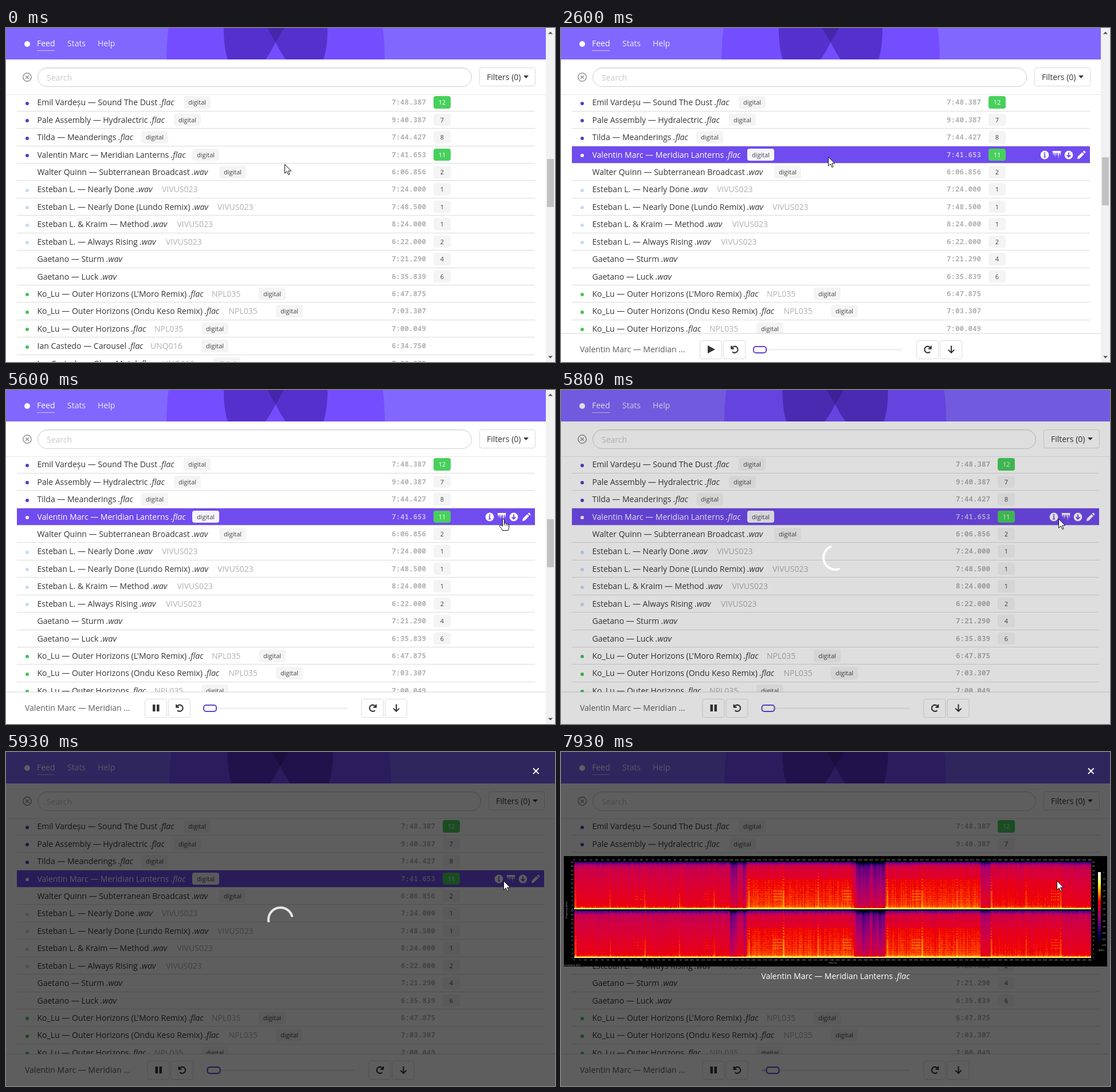
Animation, 958 px wide and 584 px high, one loop 8 s. Source, as an HTML page with a canvas:

```html
<!DOCTYPE html>
<html lang="en">
<head>
<meta charset="utf-8">
<title>Track feed</title>
<style>
html, body { margin: 0; width: 100%; height: 100%; overflow: hidden; background: #fff; }
body { position: relative; font: 14px/20px "Open Sans", "Noto Sans", sans-serif; color: #363636; }
body *, body *::before { box-sizing: border-box; }
#app, #app div, #app span, #bar, #app svg, .over, .over *, #cursor svg { position: absolute; white-space: nowrap; }
#app { left: 0; top: 0; width: 942px; height: 584px; overflow: hidden; background: #fff; }
#app.wide { width: 958px; }

#nav { left: 0; top: 0; width: 100%; height: 55px; background: #8267ff; color: rgba(255,255,255,.86); }
#nav svg { left: 0; top: 0; width: 100%; height: 55px; }
#nav span { top: 17px; }
#nav .on { left: 54px; width: 31px; height: 23px; color: #fff; border-bottom: 1px solid #cfc4ff; }
#nav .logo { left: 32px; top: 22.5px; width: 10px; height: 10px; border-radius: 50%; background: #fff; }

#tools { left: 0; top: 55px; width: 100%; height: 62px; background: #fff; border-bottom: 1px solid #e8e8e8; }
#clear { left: 29px; top: 23px; }
#search { left: 55px; right: 129px; top: 14px; height: 34px; border: 1px solid #d0d0d0; border-radius: 17px;
  padding: 7px 15px; color: #c8c8c8; line-height: 20px; box-shadow: inset 0 1px 2px rgba(10,10,10,.08); }
#filters { right: 18px; top: 14px; width: 98px; height: 33px; border: 1px solid #dbdbdb; border-radius: 4px; padding: 6px 12px; line-height: 20px; }
#filters svg { right: 11px; top: 13px; }

.row { left: 19px; right: 19px; height: 30.43px; border-bottom: 1px solid #dbdbdb; line-height: 20px; --bg: #fafafa; }
.row .dot { left: 15px; top: 13.4px; width: 6px; height: 6px; border-radius: 50%; }
.row .name { left: 35.5px; top: 5px; }
.row .code { top: 5px; color: #b0b0b0; }
.row .tag, .row .num { top: 4px; height: 21.5px; border-radius: 4px; background: #f4f4f4; font-size: 11px; line-height: 21px; text-align: center; color: #444; }
.row .tag { width: 47px; }
.row .num { right: 147px; width: 30px; }
.row .num.hot { background: #48d05c; color: #fff; }
.row .time { right: 190px; top: 5px; font: bold 12.5px/20px "Noto Sans Mono", "DejaVu Sans Mono", monospace; color: #b3b3b3; }
.row .tools { right: 7px; top: 7px; width: 80px; height: 16px; color: #5733c6; display: none; }
.row.hover { background: #fafafa; }
.row.hover .tools { display: block; }
.row.picked { background: #704bf0; color: #fff; --bg: #704bf0; }
.row.picked .dot { background: #fff !important; }
.row.picked .tag { background: #f6f4fb; }
.row.picked .time { color: #c2b8e6; }
.row.picked .tools { color: #fff; }

#player { left: 0; width: 100%; height: 60px; background: #fff; border-top: 1px solid #e4e4e4; box-shadow: 0 -1px 2px rgba(0,0,0,.07); }
#player .now { left: 33px; top: 17.5px; color: #5c5c5c; }
#player .btn { top: 11px; width: 39px; height: 33px; border: 1px solid #dbdbdb; border-radius: 4px; color: #333; }
#player .btn svg { left: 10.5px; top: 7.5px; }
.wide .pl { transform: translateX(4.5px); }
.wide .pr { transform: translateX(12.5px); }
#track { left: 346px; top: 26px; width: 250px; height: 3px; border-radius: 2px; background: #f0f0f0; }
.wide #track { width: 258px; }
#done { left: 346px; top: 26px; height: 3px; background: #cfc3f7; }
#knob { top: 21px; width: 24px; height: 13px; border: 2px solid #6344d2; border-radius: 5px; background: #fff; }

#bar { right: 0; top: 0; width: 16px; height: 584px; background: #f1f1f1; }
#thumb { position: absolute; left: 2px; width: 12px; height: 84px; background: #c1c1c1; }
#bar svg { position: absolute; left: 4px; }
.over { left: 0; top: 0; width: 958px; height: 584px; }
#shade { background: #000; }
#view { color: #fff; }
#view canvas { left: 5px; top: 182px; }
#view p { margin: 0; left: 0; width: 100%; top: 382px; text-align: center; white-space: nowrap; }
#cursor { position: absolute; left: 0; top: 0; }
#cursor svg { overflow: visible; }
</style>
</head>
<body>
<svg width="0" height="0" style="position:absolute">
  <defs>
    <symbol id="info" viewBox="0 0 16 16"><circle cx="8" cy="8" r="7.4" fill="currentColor"/><circle cx="8" cy="4.5" r="1.2" fill="var(--bg)"/><path d="M6.4 7.3H8.2V11.6M6.2 11.6H10" fill="none" stroke="var(--bg)" stroke-width="1.6"/></symbol>
    <symbol id="ice" viewBox="0 0 16 16"><path fill="currentColor" d="M.5 1h15l-1.3 9-1.2-6h-.9l-1 11-1.2-11h-1l-.9 6-.9-6h-.9l-1 8-1.1-8H3l-.8 5z"/></symbol>
    <symbol id="load" viewBox="0 0 16 16"><circle cx="8" cy="8" r="7.4" fill="currentColor"/><path d="M8 3.6v8M4.6 8.2 8 11.6l3.4-3.4" fill="none" stroke="var(--bg)" stroke-width="1.9"/></symbol>
    <symbol id="pen" viewBox="0 0 16 16"><path fill="currentColor" d="M.8 15.2l1-4.4 7.8-7.6 3.2 3.2-7.6 7.8zM10.6 2.2l1.3-1.3q.8-.7 1.6 0l1.6 1.6q.7.8 0 1.6l-1.3 1.3z"/></symbol>
    <symbol id="play" viewBox="0 0 16 16"><path fill="currentColor" d="M2 1l13 7-13 7z"/></symbol>
    <symbol id="pause" viewBox="0 0 16 16"><path fill="currentColor" d="M2 2h4.5v12H2zM9 2h4.5v12H9z"/></symbol>
    <symbol id="undo" viewBox="0 0 16 16"><path d="M2.2 1.8V6.6H7M2.8 6.2A5.6 5.6 0 1 1 4 12.2" fill="none" stroke="currentColor" stroke-width="2.1"/></symbol>
    <symbol id="redo" viewBox="0 0 16 16"><path d="M13.8 1.8V6.6H9M13.2 6.2A5.6 5.6 0 1 0 12 12.2" fill="none" stroke="currentColor" stroke-width="2.1"/></symbol>
    <symbol id="down" viewBox="0 0 16 16"><path d="M8 1.5V14M2.8 8.6 8 13.8l5.2-5.2" fill="none" stroke="currentColor" stroke-width="2"/></symbol>
  </defs>
</svg>

<div id="app">
  <div id="rows"></div>
  <div id="nav">
    <svg viewBox="0 0 942 55" preserveAspectRatio="none">
      <path fill="#744dff" d="M283.5 0Q280.5 25 280 55H661Q660.5 25 657.5 0Z"/>
      <g fill="#5630cc">
        <path id="lens" d="M380 0C380 22 382 40 387 55H453Q463 41 470.5 25Q478 13 485 0Z"/>
        <use href="#lens" transform="translate(941 0) scale(-1 1)"/>
      </g>
      <path fill="#4527aa" d="M456 0Q463 13 470.5 25Q478 13 485 0Z"/>
    </svg>
    <span class="logo"></span><span class="on">Feed</span>
    <span style="left:107px">Stats</span><span style="left:160px">Help</span>
  </div>
  <div id="tools">
    <svg id="clear" width="16" height="16" fill="none" stroke="#929292" stroke-width="1.5"><circle cx="8" cy="8" r="7.2"/><path d="M5.2 5.2l5.6 5.6M10.8 5.2l-5.6 5.6"/></svg>
    <div id="search">Search</div>
    <div id="filters">Filters (0)<svg width="9" height="5"><path fill="#363636" d="M0 0h9L4.5 5z"/></svg></div>
  </div>
  <div id="player">
    <span class="now">Valentin Marc — Meridian ...</span>
    <div class="pl">
      <div class="btn" style="left:242px"><svg width="16" height="16"><use id="toggle" href="#play"/></svg></div>
      <div class="btn" style="left:283px"><svg width="16" height="16"><use href="#undo"/></svg></div>
      <div id="track"></div><div id="done"></div><div id="knob"></div>
    </div>
    <div class="pr">
      <div class="btn" style="left:620px"><svg width="16" height="16"><use href="#redo"/></svg></div>
      <div class="btn" style="left:661px"><svg width="16" height="16"><use href="#down"/></svg></div>
    </div>
  </div>
</div>
<div id="bar">
  <svg width="8" height="5" style="top:6px"><path fill="#505050" d="M0 4.5h8L4 .5z"/></svg>
  <div id="thumb"></div>
  <svg width="8" height="5" style="top:573px"><path fill="#505050" d="M0 .5h8L4 4.5z"/></svg>
</div>
<div id="shade" class="over"></div>
<svg id="chrome" class="over" fill="none" stroke="#fff">
  <path id="close" stroke-width="2" d="M920 28.5l9.6 9.6M929.6 28.5l-9.6 9.6"/>
  <path id="spin" stroke-width="4" d="M500 293A21 21 0 0 1 458 293"/>
</svg>
<div id="view" class="over"><canvas id="spectrum" width="948" height="193"></canvas><p>Valentin Marc — Meridian Lanterns <i style="position:static">.flac</i></p></div>
<div id="cursor">
  <svg id="arrow" width="13" height="20"><path fill="#fff" stroke="#111" d="M.5.5V16.2l3.7-3.5 2.6 5.9 2.3-1-2.5-5.7h5.1z"/></svg>
  <svg id="hand" width="17" height="22"><path fill="#fff" stroke="#111" stroke-linejoin="round" d="M-1.5 13V2Q-1.5.5 0 .5T1.5 2V8Q4 6.8 4.6 8.8 7 7.8 7.4 9.8 9.8 9.2 9.8 11.4V15Q9.6 18 8 20.5H-1.5Q-2.8 17.5-6.6 13.5-7.2 11.5-5.2 11.2-3.6 11.6-1.5 13ZM1.5 8v3.5M4.6 9v3M7.4 10v2.5"/></svg>
</div>

<script>
const $ = id => document.getElementById(id);
const LOOP = 8000, PITCH = 30.43;
const BLUE = '#5a3cc8', PALE = '#c6dbf8', GREEN = '#45c455';

// name, extension, dot, code, code x, tag x, time, plays
const tracks = [
  ['Emil Vardeșu — Sound The Dust', 'flac', BLUE, '', 0, 310, '7:48.387', 12],
  ['Pale Assembly — Hydralectric', 'flac', BLUE, '', 0, 293, '9:40.387', 7],
  ['Tilda — Meanderings', 'flac', BLUE, '', 0, 236, '7:44.427', 8],
  ['Valentin Marc — Meridian Lanterns', 'flac', BLUE, '', 0, 325, '7:41.653', 11],
  ['Walter Quinn — Subterranean Broadcast', 'wav', '', '', 0, 372, '6:06.856', 2],
  ['Esteban L. — Nearly Done', 'wav', PALE, 'VIVUS023', 272, 0, '7:24.000', 1],
  ['Esteban L. — Nearly Done (Lundo Remix)', 'wav', PALE, 'VIVUS023', 369, 0, '7:48.500', 1],
  ['Esteban L. & Kraim — Method', 'wav', PALE, 'VIVUS023', 298.5, 0, '8:24.000', 1],
  ['Esteban L. — Always Rising', 'wav', PALE, 'VIVUS023', 279, 0, '6:22.000', 2],
  ['Gaetano — Sturm', 'wav', '', '', 0, 0, '7:21.290', 4],
  ['Gaetano — Luck', 'wav', '', '', 0, 0, '6:35.839', 6],
  ['Ko_Lu — Outer Horizons (L\'Moro Remix)', 'flac', GREEN, 'NPL035', 359, 441, '6:47.875', 0],
  ['Ko_Lu — Outer Horizons (Ondu Keso Remix)', 'flac', GREEN, 'NPL035', 388.5, 471, '7:03.307', 0],
  ['Ko_Lu — Outer Horizons', 'flac', GREEN, 'NPL035', 259, 341, '7:00.049', 0],
  ['Ian Castedo — Carousel', 'flac', GREEN, 'UNQ016', 252, 341, '6:34.750', 0],
  ['Ian Castedo — Glass Motel', 'flac', GREEN, 'UNQ016', 273, 362, '7:08.375', 0]
];

const icons = ['info', 'ice', 'load', 'pen'].map((id, i) =>
  `<svg width="16" height="16" style="left:${i * 21.2}px"><use href="#${id}"/></svg>`).join('');

const rows = tracks.map(([name, ext, dot, code, codeX, tagX, time, plays], i) => {
  const row = document.createElement('div');
  row.className = 'row';
  row.style.top = 115.3 + PITCH * i + 'px';
  row.innerHTML =
    (dot ? `<span class="dot" style="background:${dot}"></span>` : '') +
    `<span class="name">${name.replace('&', '&amp;')} <i>.${ext}</i></span>` +
    (code ? `<span class="code" style="left:${codeX - 19}px">${code}</span>` : '') +
    (tagX ? `<span class="tag" style="left:${tagX - 19}px">digital</span>` : '') +
    `<span class="time">${time}</span>` +
    (plays ? `<span class="num${plays > 9 ? ' hot' : ''}">${plays}</span>` : '') +
    `<div class="tools">${icons}</div>`;
  $('rows').append(row);
  return row;
});
$('rows').style.cssText = 'left:0;top:0;width:100%;height:584px';

// Spectrogram
let seed = 7;
const rnd = () => (seed = seed * 16807 % 2147483647) / 2147483647;
const bump = v => Math.sin(v * Math.PI / 2);
function heat(x) {
  x = Math.max(0, Math.min(1, x));
  const r = x < .13 ? 0 : x < .73 ? bump((x - .13) / .6) : 1;
  const g = x < .6 ? 0 : x < .91 ? bump((x - .6) / .31) : 1;
  const b = x < .6 ? .5 * Math.sin(x / .6 * Math.PI) : x < .78 ? 0 : (x - .78) / .22;
  return [r * 255, g * 255, b * 255];
}
// first column, loudness
const parts = [[0, -.01], [272, -.17], [284, -.03], [294, -.12], [301, .05], [484, -.03], [492, -.18],
  [516, -.1], [521, -.19], [543, .05], [709, -.07], [727, .02], [850, -.01]];

function drawSpectrum() {
  const ctx = $('spectrum').getContext('2d');
  const W = 902, H = 83;
  ctx.fillStyle = '#000';
  ctx.fillRect(0, 0, 948, 193);
  for (const top of [10, 95]) {
    const img = ctx.createImageData(W, H);
    for (let c = 0; c < W; c++) {
      const loud = parts.filter(p => p[0] <= c).pop()[1];
      const tone = (rnd() - .5) * (loud < -.1 ? .15 : .05);
      const beat = (c + 59.5) % 60.5 < 2.2;
      const edge = .05 + rnd() * .07;
      for (let y = 0; y < H; y++) {
        const v = y / (H - 1);
        let x = .44 + .14 * v ** .6 + loud * (loud < 0 ? 1.15 - v * .7 : .6) + tone + (rnd() - .5) * .05;
        if (loud > .01 && v > .36) x += loud * .8 + .008 * Math.sin(y * 1.6);
        if (v < edge) x -= .24 * (1 - v / edge);
        if (beat && (v > .6 || y % 5 < 2)) x += .07;
        if (c % 121 > 104 && v > .6 && v < .82 && y % 5 < 2) x += .05;
        if (v > .86) x += (v - .86) * .35 * rnd();
        if (v > .94) x += (v - .94) * 2.4;
        if (y > H - 3) x = .86 + rnd() * .08;
        img.data.set([...heat(x), 255], (y * W + c) * 4);
      }
    }
    ctx.putImageData(img, 18, top);
  }
  for (let y = 0; y < 128; y++) {
    ctx.fillStyle = `rgb(${heat(1 - y / 128).map(Math.round)})`;
    ctx.fillRect(932, 28 + y, 5, 1);
  }
  ctx.fillStyle = '#a8a8a8';
  ctx.font = '4px "Liberation Sans", sans-serif';
  ctx.textAlign = 'center';
  for (let s = 0; s <= 460; s += 5) {
    for (const y of [8, 183]) ctx.fillText(s, 18 + s * 1.956, y);
  }
  for (let k = 0; k <= 22; k += 2) {
    for (const base of [94, 179]) {
      const y = base - k * 3.75;
      ctx.fillText(k, 14.5, y);
      ctx.fillText(k, 924, y);
    }
  }
  for (let d = 0; d <= 120; d += 10) ctx.fillText(-d, 942, 30 + d * 1.06);
  ctx.fillText('dBFS', 938, 166);
  ctx.fillText('Time (s)', 469, 188);
  ctx.textAlign = 'left';
  ctx.fillText('Created by SoX', 0, 191.5);
  ctx.translate(6, 109);
  ctx.rotate(-Math.PI / 2);
  ctx.fillText('Frequency (kHz)', 0, 0);
}
drawSpectrum();

// time, x, y
const path = [
  [0, 486, 238], [135, 486, 238], [330, 466, 262], [465, 466, 262], [730, 426, 255], [1000, 467, 247],
  [1735, 467, 247], [1800, 468, 239.5], [1870, 467, 228], [1930, 466, 224.5], [3400, 466, 224.5],
  [4270, 893, 225], [4400, 899, 222.5], [4530, 903, 223], [4800, 903, 223], [5200, 869, 226],
  [5420, 869, 226], [5600, 867.5, 225], [6465, 867.5, 225], [6800, 898, 226], [7735, 898, 226], [7930, 864.5, 224.5], [8000, 864.5, 224.5]
];
function pointer(t) {
  const i = Math.max(1, path.findIndex(p => p[0] > t));
  const [a, b] = [path[i - 1], path[i]];
  const k = (t - a[0]) / (b[0] - a[0]);
  return [1, 2].map(n => a[n] + (b[n] - a[n]) * k);
}
const ramp = (t, from, to) => Math.max(0, Math.min(1, (t - from) / (to - from)));
const show = (id, on) => { $(id).style.display = on ? '' : 'none'; };

function render(t) {
  const wide = t >= 5735, picked = t >= 2330;
  $('app').className = wide ? 'wide' : '';
  show('bar', !wide);
  $('thumb').style.top = (picked ? 226 : 229) + 'px';

  rows[4].className = 'row' + (t >= 200 && t < 1860 ? ' hover' : '');
  rows[3].className = 'row' + (t >= 1860 ? ' hover' : '') + (picked ? ' picked' : '');

  const slide = 1 - (1 - ramp(t, 2390, 2790)) ** 3;
  $('player').style.top = 586 - 58.5 * slide + 'px';
  show('player', t > 2390);
  $('toggle').setAttribute('href', t < 2730 ? '#play' : '#pause');
  const played = Math.floor(Math.max(0, t - 2760) / 285);
  $('knob').style.left = 334.5 + played + 'px';
  $('done').style.width = played + 'px';

  const dim = ramp(t, 5768, 5930);
  $('shade').style.opacity = .63 * dim;
  show('chrome', wide);
  $('close').style.opacity = ramp(t, 5800, 5925);
  show('spin', t < 6300);
  $('spin').style.opacity = 1 - .15 * dim;
  $('spin').setAttribute('transform', `rotate(${69 + (t - 5800) * .75} 479 293)`);
  $('view').style.opacity = 1 - (1 - ramp(t, 6300, 6760)) ** 2;

  const [x, y] = pointer(t), hand = t > 4230 && t < 5700;
  $('cursor').style.transform = `translate(${Math.round(x)}px,${Math.round(y)}px)`;
  show('hand', hand);
  show('arrow', !hand);
}

const start = performance.now();
function tick() {
  render((performance.now() - start) % LOOP);
  requestAnimationFrame(tick);
}
tick();
</script>
</body>
</html>
```
